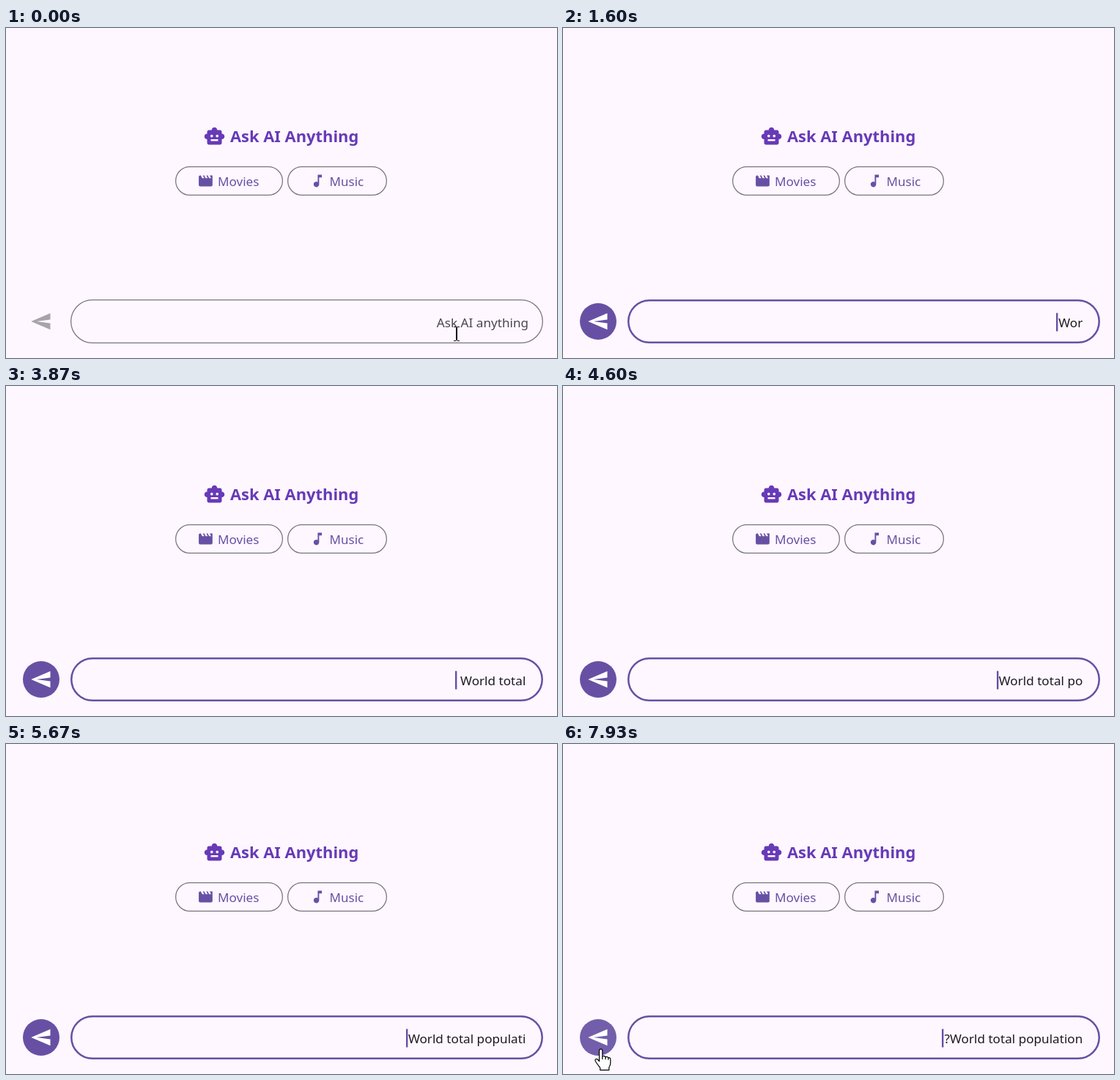
Animation, 752 px wide and 451 px high, one loop 8000 ms. Source, as an HTML page with a canvas:

```html
<!DOCTYPE html>
<html lang="en">
<head>
<meta charset="utf-8">
<title>Ask AI Anything</title>
<style>
  html, body { margin: 0; width: 100%; height: 100%; overflow: hidden; background: #fef7ff; }
  canvas { display: block; width: 752px; height: 451px; }
</style>
</head>
<body>
<canvas id="stage"></canvas>
<script>
const W = 752, H = 451, LOOP = 8000;
const canvas = document.getElementById('stage');
const ctx = canvas.getContext('2d');
const dpr = window.devicePixelRatio || 1;
canvas.width = W * dpr;
canvas.height = H * dpr;

const FONT = '"Noto Sans", "Open Sans", sans-serif';
const BACK = [254, 247, 255], PRIMARY = [103, 80, 164], OUTLINE = [121, 116, 126];
const INK = [29, 27, 32], DISABLED = [168, 163, 170], WHITE = [255, 255, 255];
const HOVER = [115, 94, 171];
const TITLE = '#673ab7', HINT = '#49454f';

const ROBOT = new Path2D('M20 9V7c0-1.1-.9-2-2-2h-3c0-1.66-1.34-3-3-3S9 3.34 9 5H6c-1.1 0-2 .9-2 2v2c-1.66 0-3 1.34-3 3s1.34 3 3 3v4c0 1.1.9 2 2 2h12c1.1 0 2-.9 2-2v-4c1.66 0 3-1.34 3-3s-1.34-3-3-3zM7.5 11.5a1.5 1.5 0 0 1 3 0a1.5 1.5 0 0 1-3 0zM16 17H8v-2h8zM13.5 11.5a1.5 1.5 0 0 1 3 0a1.5 1.5 0 0 1-3 0z');
const FILM = new Path2D('M18 4l2 4h-3l-2-4h-2l2 4h-3l-2-4H8l2 4H7L5 4H4a2 2 0 0 0-2 2v12a2 2 0 0 0 2 2h16a2 2 0 0 0 2-2V4z');
const NOTE = new Path2D('M12 3v10.55A4 4 0 1 0 14 17V7h4V3z');
const PLANE = new Path2D('M2 21L23 12 2 3v7l15 2-15 2z');
const HAND = new Path2D('M-2 16V2.5a2 2 0 0 1 4.3 0V10.5q2.3-1.8 4.2.8 2.4-1.3 3.8 1 2.9-.8 3 2.2v5q0 3-2 6v3.7H-.8v-3L-6 19q-3-4-.5-5 1.6-.6 4.5 3z');
const KNUCKLES = new Path2D('M2.3 10.5v4M6.5 11.3v3.5M10.3 12.3v3');

const QUERY = 'World total population?';
const KEYS = [1270, 1400, 1600, 1930, 2130, 2330, 2730, 2870, 3200, 3470, 3600, 3870,
  4470, 4600, 4730, 4930, 5200, 5330, 5530, 5670, 5800, 6000, 6530];
const HOVER_FIELD = [70, 130], FOCUS = [270, 330, 400], ENABLE = [1270, 1330, 1400];
const HOVER_SEND = [7730, 7830, 7930];
const CARET_OFF = [[800, 1270], [4330, 4470], [7000, 7530]];

const passed = (t, times) => times.filter(x => x <= t).length;
const ramp = (t, times) => passed(t, times) / times.length;
const mix = (a, b, k) => a.map((v, i) => v + (b[i] - v) * k);
const rgb = c => `rgb(${c.map(Math.round)})`;

function icon(path, x, y, scale, color, flip) {
  ctx.save();
  ctx.translate(x, y);
  ctx.scale(flip ? -scale : scale, scale);
  ctx.fillStyle = color;
  ctx.fill(path, 'evenodd');
  ctx.restore();
}

function pill(x, y, w, h, line, color) {
  ctx.beginPath();
  ctx.roundRect(x + line / 2, y + line / 2, w - line, h - line, (h - line) / 2);
  ctx.lineWidth = line;
  ctx.strokeStyle = color;
  ctx.stroke();
}

function label(str, x, y, size, weight, color, align = 'left') {
  ctx.font = `${weight} ${size}px ${FONT}`;
  ctx.textAlign = align;
  ctx.fillStyle = color;
  ctx.fillText(str, x, y);
}

function header() {
  icon(ROBOT, 269.5, 133.2, 1.25, TITLE);
  label('Ask AI Anything', 306, 156, 21.9, 700, TITLE);
  const line = rgb(OUTLINE), main = rgb(PRIMARY);
  pill(231, 189, 147, 40, 1.25, line);
  icon(FILM, 261.2, 197.7, 0.9375, main);
  label('Movies', 289, 215.5, 17.1, 500, main);
  pill(384, 189, 136, 40, 1.25, line);
  icon(NOTE, 414.2, 197.7, 0.9375, main);
  label('Music', 441.6, 215.5, 17, 500, main);
}

function field(t) {
  const focus = ramp(t, FOCUS);
  const idle = mix(OUTLINE, INK, ramp(t, HOVER_FIELD));
  pill(88, 371, 645, 60, 1.25 + 1.25 * focus, rgb(mix(idle, PRIMARY, focus)));

  const typed = QUERY.slice(0, passed(t, KEYS));
  let caret = 709.3;
  if (typed) {
    // Right-to-left field: trailing punctuation lands on the left
    const shown = typed.endsWith('?') ? '?' + typed.slice(0, -1) : typed.trimEnd();
    label(shown, 709.3, 409, 17.15, 400, rgb(INK), 'right');
    caret = 706.3 - ctx.measureText(typed).width;
  } else {
    label('Ask AI anything', 587.8, 409, 17.15, 400, HINT);
  }
  const hidden = CARET_OFF.some(([a, b]) => t >= a && t < b);
  if (focus && !hidden) {
    ctx.fillStyle = rgb(PRIMARY);
    ctx.fillRect(Math.round(caret), 389.5, 2.4, 25);
  }
}

function sendButton(t) {
  const on = ramp(t, ENABLE);
  if (on) {
    const fill = mix(PRIMARY, HOVER, ramp(t, HOVER_SEND));
    ctx.fillStyle = rgb(mix(BACK, fill, on));
    ctx.beginPath();
    ctx.arc(48, 401, 25, 0, Math.PI * 2);
    ctx.fill();
  }
  icon(PLANE, 63, 386, 1.25, rgb(mix(DISABLED, WHITE, on)), true);
}

function pointer(t) {
  if (t < FOCUS[1]) {
    ctx.fillStyle = '#000';
    ctx.fillRect(614, 409, 2, 18);
    for (const y of [408, 427]) {
      ctx.fillRect(611, y, 3, 1);
      ctx.fillRect(616, y, 3, 1);
    }
  }
  const step = passed(t, HOVER_SEND);
  if (step) {
    ctx.save();
    ctx.translate(51.5, 416.5 + [20, 7, 0][step - 1]);
    ctx.fillStyle = '#fff';
    ctx.strokeStyle = '#000';
    ctx.lineWidth = 1.2;
    ctx.lineJoin = 'round';
    ctx.fill(HAND);
    ctx.stroke(HAND);
    ctx.stroke(KNUCKLES);
    ctx.restore();
  }
}

function draw(t) {
  ctx.setTransform(dpr, 0, 0, dpr, 0, 0);
  ctx.fillStyle = rgb(BACK);
  ctx.fillRect(0, 0, W, H);
  header();
  field(t);
  sendButton(t);
  pointer(t);
}

const start = performance.now();
function tick() {
  draw((performance.now() - start) % LOOP);
  requestAnimationFrame(tick);
}
tick();
</script>
</body>
</html>
```
